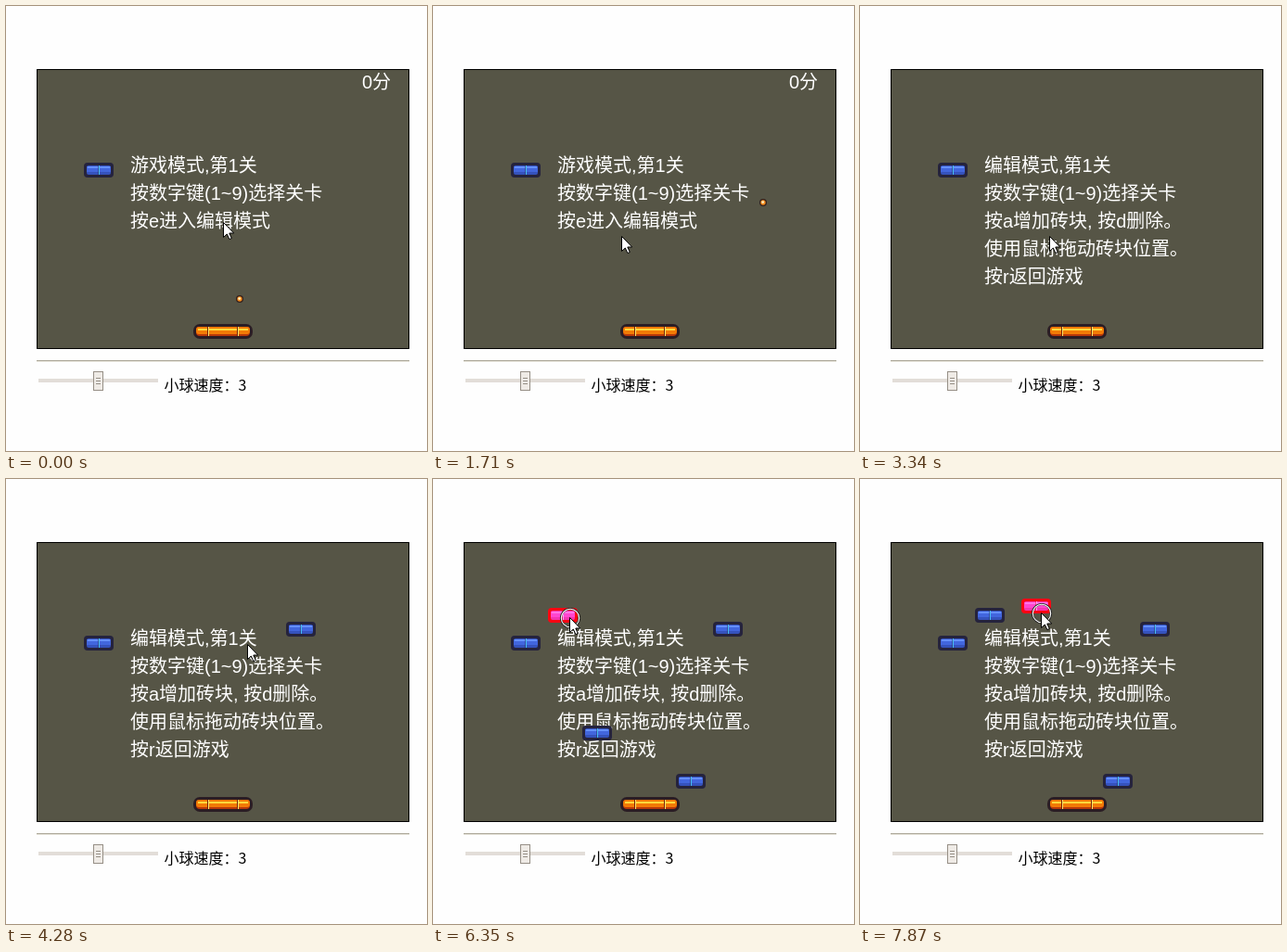
These frames come from a looping animation (454 px wide and 480 px high, 8000 ms). An HTML page:

```html
<!DOCTYPE html>
<html lang="zh">
<head>
<meta charset="utf-8">
<title>打砖块</title>
<style>
html, body { margin: 0; width: 100%; height: 100%; overflow: hidden; background: #fefefe; }
svg { display: block; width: 454px; height: 480px; }
rect { shape-rendering: crispEdges; }
.round { shape-rendering: auto; }
.hud { font: 500 20px "Liberation Sans", Arial, "Noto Sans CJK SC", "Noto Sans CJK", sans-serif; fill: #fff; }
.label { font: 300 16px "Noto Sans CJK SC", "Noto Sans CJK", sans-serif; fill: #000; }
.brick { --edge: #25233d; --top: #648ffa; --mid: #4266de; --low: #3552bc; --seam: #45bdf2; }
.brick.picked { --edge: #fc0612; --top: #ff74e8; --mid: #ff46cf; --low: #f534b0; --seam: #ff9cf4; }
</style>
</head>
<body>
<svg viewBox="0 0 454 480">
  <defs>
    <g id="brick">
      <rect class="round" width="32" height="16" rx="4" style="fill:var(--edge)"/>
      <rect class="round" x="3" y="3" width="26" height="10" rx="2" style="fill:var(--low)"/>
      <rect x="3" y="4" width="26" height="6" style="fill:var(--mid)"/>
      <rect x="4" y="4" width="24" height="2" style="fill:var(--top)"/>
      <rect x="15" y="3" width="1" height="10" style="fill:var(--edge)" opacity=".4"/>
      <rect x="16" y="3" width="1" height="10" style="fill:var(--seam)"/>
    </g>
    <g id="joint">
      <rect x="-1" y="3" width="1" height="10" fill="#7a2408"/>
      <rect y="3" width="1" height="10" fill="#ffe668"/>
    </g>
  </defs>

  <rect x="33" y="68" width="402" height="302" fill="#000"/>
  <rect x="34" y="69" width="400" height="300" fill="#565546"/>

  <g class="hud" id="play">
    <text x="384" y="89">0分</text>
    <text x="134" y="179">游戏模式,第1关</text>
    <text x="134" y="209">按数字键(1~9)选择关卡</text>
    <text x="134" y="239">按e进入编辑模式</text>
  </g>
  <g class="hud" id="edit">
    <text x="134" y="179">编辑模式,第1关</text>
    <text x="134" y="209">按数字键(1~9)选择关卡</text>
    <text x="134" y="239">按a增加砖块, 按d删除。</text>
    <text x="134" y="269">使用鼠标拖动砖块位置。</text>
    <text x="134" y="299">按r返回游戏</text>
  </g>

  <g transform="translate(202 343)">
    <rect class="round" width="64" height="16" rx="7" fill="#2b1d24"/>
    <rect class="round" x="3" y="3" width="58" height="10" rx="4" fill="#b8380a"/>
    <rect class="round" x="3" y="3" width="58" height="8" rx="3" fill="#f27a06"/>
    <rect x="5" y="5" width="54" height="2" fill="#ffd83c"/>
    <use href="#joint" x="16"/>
    <use href="#joint" x="48"/>
  </g>

  <g id="bricks"></g>
  <g id="ball">
    <circle r="4" fill="#33201c"/>
    <circle r="2.7" fill="#f58a1c"/>
    <circle cx="-.3" cy="-.4" r="1.4" fill="#fff0c0"/>
  </g>

  <rect x="33" y="382" width="402" height="1" fill="#aca899"/>
  <rect x="33" y="383" width="402" height="1" fill="#e6e3da"/>
  <rect x="35" y="402" width="129" height="4" fill="#e2ddd8"/>
  <rect x="94" y="394" width="11" height="21" fill="#968f86"/>
  <rect x="95" y="395" width="9" height="19" fill="#efebe6"/>
  <path d="M97 401.5h5M97 404.5h5M97 407.5h5" stroke="#968f86"/>
  <text class="label" x="170.5" y="415">小球速度：3</text>

  <g id="cursor">
    <g id="ring" fill="none">
      <circle cx="1" cy="1" r="10" stroke="#222" stroke-width="2.2"/>
      <circle cx="1" cy="1" r="9.7" stroke="#fff" stroke-width="1.1"/>
    </g>
    <path d="M.5 .5V16.5L4.3 13L6.9 18.6L9.3 17.5L6.8 12H11.7Z" fill="#fff" stroke="#000"/>
  </g>
</svg>
<script>
const LOOP = 8000, STEP = 137, EDIT_AT = 2380, BALL_SPEED = 0.061;
const $ = id => document.getElementById(id);

// The screen refreshes in even steps of about STEP ms between these beats.
const beats = [0, 1710, 3340, 4280, 5330, 6350, 7870, LOOP];

// Pointer stops: time, x, y
const path = [
  [0, 234, 233], [900, 203, 248], [3340, 204, 248], [3470, 206, 231],
  [3760, 206, 231], [4280, 260, 178], [4800, 282, 174], [5330, 245, 274],
  [5470, 241, 281], [6220, 135, 160], [6350, 147, 149], [6480, 147, 149],
  [7040, 182, 272], [7170, 182, 272], [7870, 195, 144]
];

const bricks = [
  { x: 84, y: 169, born: 0 },
  { x: 302, y: 154, born: 4000 },
  { x: 262, y: 318, born: 4500 },
  { x: 219, y: 279, born: 4900, grab: 5470, drop: 6350 },
  { x: 161, y: 266, born: 5150, grab: 7170, drop: LOOP }
];

for (const b of bricks) {
  b.el = document.createElementNS("http://www.w3.org/2000/svg", "use");
  b.el.setAttribute("href", "#brick");
  $("bricks").append(b.el);
}

function hold(t) {
  const i = beats.findIndex(v => v > t);
  const from = beats[i - 1], span = beats[i] - from;
  const step = span / Math.round(span / STEP);
  return from + Math.floor((t - from) / step) * step;
}

function pointer(t) {
  const i = path.findIndex(p => p[0] > t);
  if (i < 0) return path.at(-1).slice(1);
  const [t0, x0, y0] = path[i - 1], [t1, x1, y1] = path[i];
  const k = (t - t0) / (t1 - t0);
  return [Math.round(x0 + (x1 - x0) * k), Math.round(y0 + (y1 - y0) * k)];
}

// A dragged brick is centred on the pointer and snapped to a 10 px grid.
const snap = (v, origin, half) => origin + Math.floor((v - origin - half) / 10) * 10;

function place(b, t) {
  if (!(t > b.grab + STEP / 2)) return [b.x, b.y];
  const [x, y] = pointer(Math.min(t, b.drop));
  return [snap(x, 34, 16), snap(y, 69, 8)];
}

const show = (el, on) => el.setAttribute("visibility", on ? "visible" : "hidden");
const move = (el, [x, y]) => el.setAttribute("transform", `translate(${x} ${y})`);

function draw(t) {
  const editing = t >= EDIT_AT;
  show($("play"), !editing);
  show($("edit"), editing);
  show($("ball"), !editing);
  const d = Math.round(t * BALL_SPEED);
  move($("ball"), [252 + d, 316 - d]);

  const picked = bricks.findLast(b => t >= b.grab);
  for (const b of bricks) {
    show(b.el, t >= b.born);
    move(b.el, place(b, t));
    b.el.setAttribute("class", b === picked ? "brick picked" : "brick");
  }
  move($("cursor"), pointer(t));
  show($("ring"), picked && t <= picked.drop);
}

const start = performance.now();
let last = -1;
function frame() {
  const t = hold((performance.now() - start) % LOOP);
  if (t !== last) draw(last = t);
  requestAnimationFrame(frame);
}
frame();
</script>
</body>
</html>
```
